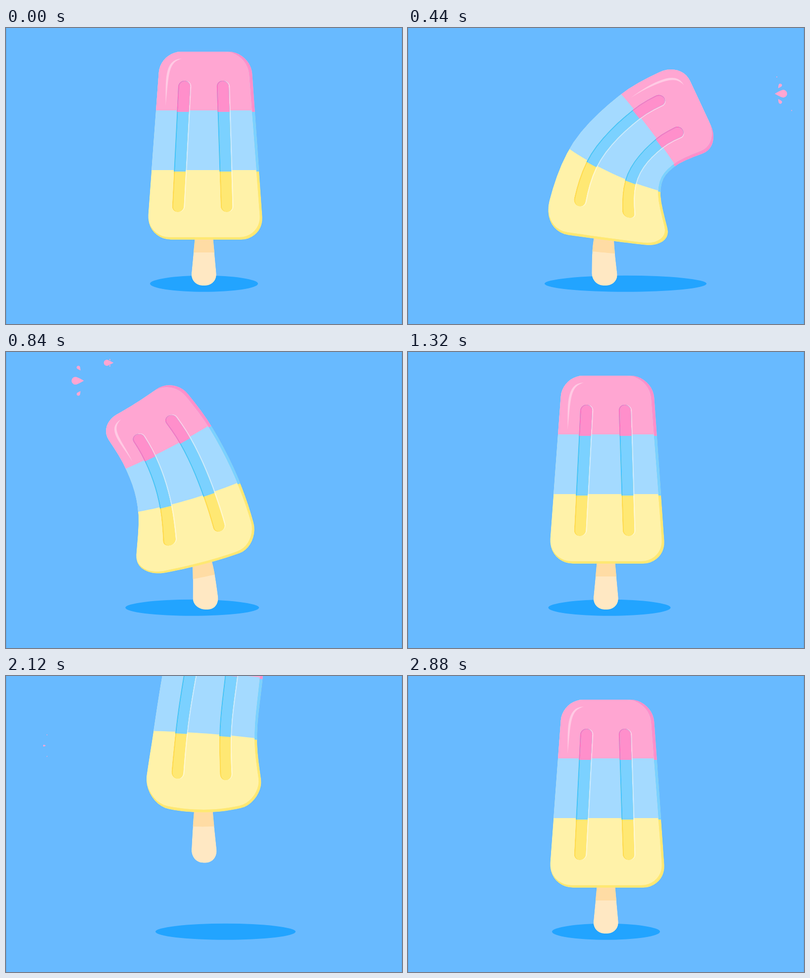
Animation, 800 px wide and 600 px high, one loop 3 s. Source, as an HTML page with a canvas:

```html
<!DOCTYPE html>
<html lang="en">
<head>
<meta charset="utf-8">
<title>Ice lolly</title>
<style>
html, body { margin: 0; width: 100%; height: 100%; overflow: hidden; background: #68baff; }
canvas { display: block; width: 800px; height: 600px; }
</style>
</head>
<body>
<canvas id="stage" width="800" height="600"></canvas>
<script>
const ctx = document.getElementById('stage').getContext('2d');
const LOOP = 3000;
const MID = 403;
const ROWS = [48, 167, 288, 429, 521];
const halfWidth = y => 100 + (y - 167) * 0.0744;

const LIGHT = ['#ffa6d2', '#a4daff', '#fff2a9'];
const SHADE = ['#ff8fcb', '#7bd1ff', '#ffe873'];
const DEEP = ['#ff70c0', '#43c3ff', '#ffdb4f'];

// A pose holds left, centre and right points for each row, top to bottom.
const rest = ROWS.flatMap(y => [MID - halfWidth(y), y, MID, y, MID + halfWidth(y), y]);
const right = [
  552, 68, 592, 154, 632, 241,
  431, 134, 489, 206, 541, 280,
  326, 245, 415, 296, 511, 331,
  272, 412, 399, 430, 533, 446,
  275, 521, 401, 521, 527, 521
];
const lean = [
  187, 147, 265, 102, 338, 49,
  242, 237, 329, 195, 413, 147,
  267, 324, 371, 299, 473, 263,
  262, 458, 400, 430, 513, 392,
  282, 521, 408, 521, 534, 521
];
const left = [
  183, 291, 209, 197, 236, 102,
  272, 307, 317, 231, 369, 158,
  291, 347, 388, 319, 483, 272,
  270, 472, 406, 445, 530, 436,
  283, 536, 409, 536, 535, 536
];
const leap = [
  340, 21, 436, 24, 530, 32,
  317, 138, 418, 141, 519, 150,
  298, 258, 404, 263, 508, 273,
  278, 403, 402, 423, 522, 400,
  277, 522, 404, 524, 531, 522
];

const mix = (pose, k) => pose.map((v, i) => rest[i] + (v - rest[i]) * k);
const lift = (pose, dy) => pose.map((v, i) => i % 2 ? v - dy : v);

const poseKeys = [
  [0, rest],
  [200, lift(mix(left, 1.12), 16)],
  [310, rest],
  [400, mix(right, 1.06)],
  [440, right],
  [570, rest],
  [700, lift(mix(left, 0.95), 14)],
  [840, lean],
  [960, rest],
  [1040, mix(right, 0.2)],
  [1180, rest],
  [1320, rest],
  [1720, left],
  [1760, mix(left, 1.02)],
  [1860, rest],
  [2120, leap],
  [2300, mix(right, 0.3)],
  [2400, mix(right, 0.6)],
  [2520, lift(mix(left, 0.3), 4)],
  [2610, mix(right, 0.08)],
  [2700, rest],
  [LOOP, rest]
];

// Centre x, half width, half height
const shadowKeys = [
  [0, [400, 109, 16.5]],
  [200, [345, 175, 16.5]],
  [440, [439.5, 163.5, 16.5]],
  [700, [355, 160, 16.5]],
  [840, [376, 135, 16.5]],
  [1040, [422, 130, 16.5]],
  [1200, [409, 124, 16.5]],
  [1320, [407, 123.5, 16.5]],
  [1720, [361, 155, 23]],
  [1760, [361, 156, 23.5]],
  [1880, [400, 125, 16.5]],
  [2120, [443.5, 141.5, 16.5]],
  [2400, [425, 140, 16.5]],
  [2520, [388, 125, 16.5]],
  [2700, [400, 109, 16.5]],
  [LOOP, [400, 109, 16.5]]
];

const drops = [
  { start: 240, x: 673, y: 135, dir: 1, spread: 17, dots: true },
  { start: 660, x: 219, y: 60, dir: -1, spread: 27 },
  { start: 820, x: 218, y: 22, dir: -1, spread: 22 },
  { start: 1700, x: 206, y: 144, dir: -1, spread: 22 },
  { start: 2340, x: 593, y: 96, dir: 1, spread: 22 }
];

function hermite(a, b, ma, mb, k, span) {
  const k2 = k * k, k3 = k2 * k;
  return a * (2 * k3 - 3 * k2 + 1) + b * (3 * k2 - 2 * k3)
    + span * (ma * (k3 - 2 * k2 + k) + mb * (k3 - k2));
}

// Eased keyframes: smooth through, flat at every turning point
function animate(keys, t) {
  let i = 0;
  while (i < keys.length - 2 && t >= keys[i + 1][0]) i++;
  const slope = (n, c) => n < 0 || n > keys.length - 2 ? 0
    : (keys[n + 1][1][c] - keys[n][1][c]) / (keys[n + 1][0] - keys[n][0]);
  const tangent = (n, c) => {
    const p = slope(n - 1, c), q = slope(n, c);
    return p * q > 0 ? 2 * p * q / (p + q) : 0;
  };
  const span = keys[i + 1][0] - keys[i][0];
  const k = (t - keys[i][0]) / span;
  return keys[i][1].map((v, c) =>
    hermite(v, keys[i + 1][1][c], tangent(i, c), tangent(i + 1, c), k, span));
}

function makeWarp(pose) {
  return ([x, y]) => {
    const u = (x - MID) / halfWidth(y);
    let i = 0;
    while (i < 3 && y > ROWS[i + 1]) i++;
    const at = (n, c) => {
      const [l, m, r] = [0, 2, 4].map(o => pose[n * 6 + o + c]);
      return m + u * (r - l) / 2 + u * u * ((l + r) / 2 - m);
    };
    const tangent = (n, c) => {
      const a = Math.max(n - 1, 0), b = Math.min(n + 1, 4);
      return (at(b, c) - at(a, c)) / (ROWS[b] - ROWS[a]);
    };
    const span = ROWS[i + 1] - ROWS[i], k = (y - ROWS[i]) / span;
    return [0, 1].map(c => hermite(at(i, c), at(i + 1, c), tangent(i, c), tangent(i + 1, c), k, span));
  };
}

function bezier(a, b, c, d, n = 10) {
  return Array.from({ length: n + 1 }, (_, i) => {
    const k = i / n, j = 1 - k;
    return [0, 1].map(q => j * j * j * a[q] + 3 * j * j * k * b[q] + 3 * j * k * k * c[q] + k * k * k * d[q]);
  });
}

const toward = (a, b, k) => [a[0] + (b[0] - a[0]) * k, a[1] + (b[1] - a[1]) * k];

function line(a, b, n = 14) {
  return Array.from({ length: n + 1 }, (_, i) => toward(a, b, i / n));
}

// Polygon of [x, y, radius] corners as a dense list of points
function rounded(corners) {
  const n = corners.length;
  const arcs = corners.map((c, i) => {
    const reach = o => toward(c, o, c[2] / Math.hypot(o[0] - c[0], o[1] - c[1]));
    const a = reach(corners[(i + n - 1) % n]), b = reach(corners[(i + 1) % n]);
    return bezier(a, toward(a, c, 0.55), toward(b, c, 0.55), b);
  });
  return arcs.flatMap((arc, i) => [...arc, ...line(arc[arc.length - 1], arcs[(i + 1) % n][0])]);
}

function slot(top, bottom) {
  const shape = (l, r, inset) => rounded([
    [top + l, 107 + inset, 12.2], [top + 26.5 + r, 107 + inset, 12.2],
    [bottom + 26 + r, 373, 12.2], [bottom + l, 373, 12.2]
  ].map(([x, y, rad]) => [x, y, Math.min(rad, (26 + r - l) / 2)]));
  return { rim: shape(0, 0, 0), deep: shape(0, -2.3, 0), fill: shape(2.2, -2.3, 1) };
}

function bandAbove(y) {
  const edge = v => halfWidth(v) * 1.07;
  return [
    ...line([MID - edge(30), 30], [MID + edge(30), 30]),
    ...line([MID + edge(30), 30], [MID + edge(y), y]),
    ...line([MID + edge(y), y], [MID - edge(y), y], 24),
    ...line([MID - edge(y), y], [MID - edge(30), 30])
  ];
}

const body = rounded([[311.8, 48, 42], [494.2, 48, 45], [521, 429, 46], [284, 429, 49]]);
const face = rounded([[311.8, 48, 42], [487.5, 48, 46], [516, 424, 44], [284, 424, 46]]);
const stick = rounded([[383, 412, 1], [417, 412, 1], [427, 522, 24.5], [372.5, 522, 24.5]]);
const stickTop = [...line([370, 410], [430, 410]), ...line([430, 455], [370, 455])];
const slots = [slot(348.5, 335), slot(425.5, 434)];
const gleam = [
  ...bezier([322.5, 158], [323, 110], [318, 63], [355, 62], 16),
  ...bezier([355, 62], [328, 70], [329, 90], [322.5, 158], 16)
];
const faceBands = [bandAbove(167), bandAbove(288)];
const shadeBands = [bandAbove(170), bandAbove(291)];

function drawLolly(t) {
  const warp = makeWarp(animate(poseKeys, t));
  const trace = points => {
    const p = new Path2D();
    points.forEach(q => p.lineTo(...warp(q)));
    p.closePath();
    return p;
  };
  const fill = (points, color) => {
    ctx.fillStyle = color;
    ctx.fill(trace(points));
  };
  const striped = (points, colors, bands) => {
    ctx.save();
    ctx.clip(trace(points));
    fill(points, colors[2]);
    fill(bands[1], colors[1]);
    fill(bands[0], colors[0]);
    ctx.restore();
  };

  // Parabolic hop
  const h = (t - 2060) / 260;
  ctx.save();
  ctx.translate(0, -155 * Math.max(0, 1 - h * h));

  ctx.save();
  ctx.clip(trace(stick));
  fill(stick, '#ffe8c3');
  fill(stickTop, '#ffdca4');
  ctx.restore();

  striped(body, SHADE, shadeBands);
  striped(face, LIGHT, faceBands);
  for (const s of slots) {
    fill(s.rim, 'rgba(255,255,255,.45)');
    striped(s.deep, DEEP, shadeBands);
    striped(s.fill, SHADE, shadeBands);
  }
  fill(gleam, 'rgba(255,255,255,.4)');
  ctx.restore();
}

function drawShadow(t) {
  const [x, rx, ry] = animate(shadowKeys, t);
  ctx.fillStyle = '#22a4ff';
  ctx.beginPath();
  ctx.ellipse(x, 518.3, rx, ry, 0, 0, Math.PI * 2);
  ctx.fill();
}

// Teardrop with its round end facing the angle
function tear(x, y, r, angle) {
  ctx.save();
  ctx.translate(x, y);
  ctx.rotate(angle);
  ctx.beginPath();
  ctx.arc(0, 0, r, -Math.PI * 0.6, Math.PI * 0.6);
  ctx.quadraticCurveTo(-r, r * 0.7, -r * 2.2, 0);
  ctx.quadraticCurveTo(-r, -r * 0.7, -r * 0.31, -r * 0.95);
  ctx.fill();
  ctx.restore();
}

function drawDrop({ start, x, y, dir, spread, dots }, t) {
  const a = (t - start) / 520;
  if (a < 0 || a > 1) return;
  const ease = 1 - (1 - a) * (1 - a);
  const size = Math.min(1, 0.75 + a) * Math.pow(Math.min(1, (1 - a) / 0.6), 1.3);
  const cx = x + dir * 130 * ease, cy = y - 3 * ease;
  const open = spread * Math.min(1, 0.2 + 2.6 * a);
  const small = size * Math.min(1, 0.3 + 2.5 * a);
  ctx.fillStyle = '#ffa6d2';
  tear(cx + dir * 4, cy, 7.8 * size, dir > 0 ? 0 : Math.PI);
  for (const side of [-1, 1]) {
    tear(cx - dir * 2, cy + side * open, 3.4 * small, Math.atan2(side, dir * 0.7));
    if (dots) {
      ctx.beginPath();
      ctx.arc(cx + 6 + side * 15, cy + side * open * 2, small, 0, Math.PI * 2);
      ctx.fill();
    }
  }
}

function draw(t) {
  ctx.fillStyle = '#68baff';
  ctx.fillRect(0, 0, 800, 600);
  drawShadow(t);
  drawLolly(t);
  drops.forEach(d => drawDrop(d, t));
  ctx.fillStyle = 'rgba(70,130,190,.35)';
  ctx.fillRect(0, 0, 1, 600);
  ctx.fillRect(799, 0, 1, 600);
}

const begin = performance.now();
function tick() {
  draw((performance.now() - begin) % LOOP);
  requestAnimationFrame(tick);
}
tick();
</script>
</body>
</html>
```
